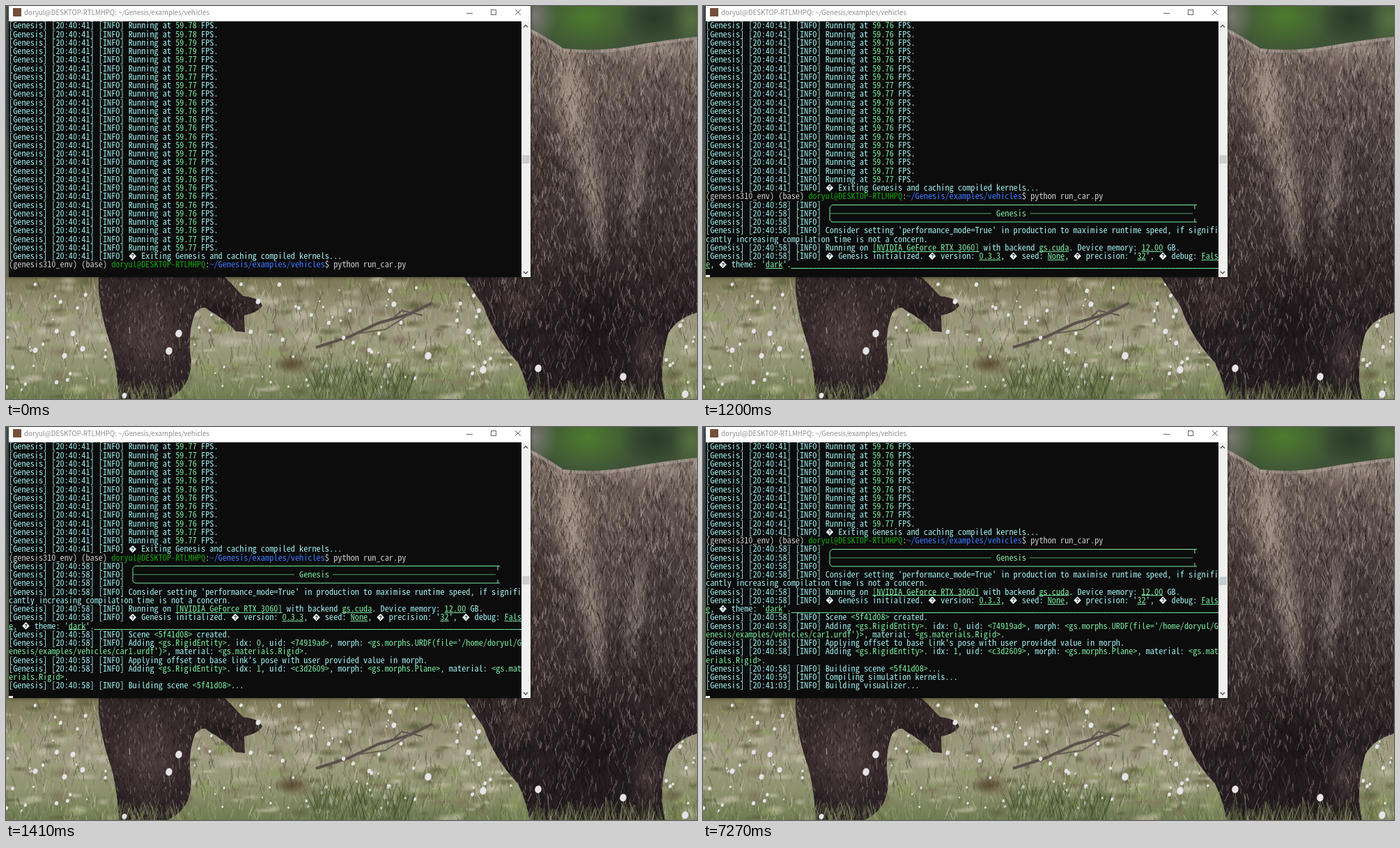
Animation, 992 px wide and 564 px high, one loop 8000 ms. Source, as an HTML page with a canvas:

```html
<!DOCTYPE html>
<html lang="en">
<head>
<meta charset="utf-8">
<title>Terminal</title>
<style>
  html, body { margin: 0; width: 100%; height: 100%; overflow: hidden; background: #0c0c0c; }
  canvas { display: block; width: 992px; height: 564px; }
</style>
</head>
<body>
<canvas id="stage" width="992" height="564"></canvas>
<script>
const LOOP = 8000, W = 992, H = 564;
const COLS = 120, ROWS = 30, LEFT = 4, TOP = 22, CELL = 736 / COLS, LINE = 12.25;
const CYAN = '#a0eeee', MINT = '#7aeaa0', GREY = '#cccccc';
const USER = 'doryul@DESKTOP-RTLMHPQ';

const ctx = document.getElementById('stage').getContext('2d');

// ---------- terminal content ----------
const STYLES = {
  '{': { color: MINT },
  '|': { color: MINT, underline: true },
  '«': { color: '#13a10e' },
  '‹': { color: '#3b78ff' }
};
const log = (clock, text) => `[Genesis] [${clock}] [INFO] ${text}`;
const fpsDigits = '8899' + '7'.repeat(4) + '6'.repeat(7) + '77' + '6'.repeat(8) + '77';

// [time shown, text, base colour]
const output = [
  ...[...fpsDigits].map(d => [0, log('20:40:41', `Running at {59.7${d}} FPS.`)]),
  [0, log('20:40:41', '◆ Exiting Genesis and caching compiled kernels...')],
  [0, `(genesis310_env) (base) «${USER}»:‹~/Genesis/examples/vehicles›$ python run_car.py`, GREY],
  [920, log('20:40:58', '╭')],
  [920, log('20:40:58', ' '.repeat(40) + '{Genesis}')],
  [920, log('20:40:58', '')],
  [990, log('20:40:58', "Consider setting 'performance_mode=True' in production to maximise runtime speed, if significantly increasing compilation time is not a concern.")],
  [990, log('20:40:58', 'Running on |[NVIDIA GeForce RTX 3060]| with backend |gs.cuda|. Device memory: |12.00| GB.')],
  [1200, log('20:40:58', "◆ Genesis initialized. ◆ version: |0.3.3|, ◆ seed: |None|, ◆ precision: '|32|', ◆ debug: |False|, ◆ theme: '|dark|'.|" + ' '.repeat(100) + '|')],
  [1270, log('20:40:58', 'Scene {<5f41d08>} created.')],
  [1270, log('20:40:58', "Adding {<gs.RigidEntity>}. idx: {0}, uid: {<74919ad>}, morph: {<gs.morphs.URDF(file='/home/doryul/Genesis/examples/vehicles/car1.urdf')>}, material: {<gs.materials.Rigid>}.")],
  [1340, log('20:40:58', "Applying offset to base link's pose with user provided value in morph.")],
  [1340, log('20:40:58', 'Adding {<gs.RigidEntity>}. idx: {1}, uid: {<c3d2609>}, morph: {<gs.morphs.Plane>}, material: {<gs.materials.Rigid>}.')],
  [1410, log('20:40:58', 'Building scene {<5f41d08>}...')],
  [2820, log('20:40:59', 'Compiling simulation kernels...')],
  [7270, log('20:41:03', 'Building visualizer...')]
];

// Turns marked-up text into rows of styled cells, wrapped at the window width.
function toRows([time, text, color = CYAN]) {
  const cells = [];
  for (const part of text.split(/(\{.*?\}|\|.*?\||«.*?»|‹.*?›)/)) {
    const style = STYLES[part[0]];
    for (const char of style ? part.slice(1, -1) : part) {
      cells.push({ char, ...(style || { color }) });
      if (char === '◆') cells.push({ char: ' ', color });
    }
  }
  const rows = [];
  for (let i = 0; i < cells.length; i += COLS) rows.push({ time, cells: cells.slice(i, i + COLS) });
  return rows;
}
const allRows = output.flatMap(toRows);

// ---------- drawing helpers ----------
const family = '"Noto Sans Mono CJK KR", "Noto Sans Mono CJK JP", "Liberation Mono", monospace';
ctx.font = `100px ${family}`;
const monoFont = `${CELL / ctx.measureText('0').width * 100}px ${family}`;

function line(g, color, width, ...points) {
  g.strokeStyle = color;
  g.lineWidth = width;
  g.beginPath();
  for (let i = 0; i < points.length; i += 2) g.lineTo(points[i], points[i + 1]);
  g.stroke();
}
function rect(g, color, x, y, w, h) {
  g.fillStyle = color;
  g.fillRect(x, y, w, h);
}
function gradient(g, y0, y1, ...colors) {
  const fill = g.createLinearGradient(0, y0, 0, y1);
  colors.forEach((c, i) => fill.addColorStop(i / (colors.length - 1), c));
  return fill;
}
function glow(g, color, x, y, rx, ry, angle = 0) {
  g.save();
  g.translate(x, y);
  g.rotate(angle);
  g.scale(rx, ry);
  const fill = g.createRadialGradient(0, 0, 0, 0, 0, 1);
  fill.addColorStop(0, color + 'cc');
  fill.addColorStop(1, color + '00');
  rect(g, fill, -1, -1, 2, 2);
  g.restore();
}

// ---------- wallpaper ----------
let seed = 7;
const random = () => (seed = (seed * 16807) % 2147483647) / 2147483647;
const between = (a, b) => a + (b - a) * random();
const pick = list => list[Math.floor(random() * list.length)];

function blades(g, count, x0, x1, y0, y1, length, colors) {
  for (let i = 0; i < count; i++) {
    const x = between(x0, x1), y = between(y0, y1), l = between(.4, 1) * length;
    g.globalAlpha = between(.2, .6);
    line(g, pick(colors), between(.6, 1.5), x, y, x + between(-.5, .5) * l, y - l);
  }
  g.globalAlpha = 1;
}
function flower(g, x, y, r) {
  line(g, '#69704f', 1, x, y, x + 2, y + r * 4);
  g.fillStyle = '#e4e3e6';
  g.beginPath();
  g.ellipse(x, y, r * .85, r, .3, 0, 7);
  g.fill();
}
function bear(g, outline, fill, glows, hairs, area, length) {
  const path = new Path2D(outline);
  g.save();
  g.clip(path);
  g.fillStyle = fill;
  g.fill(path);
  glows.forEach(args => glow(g, ...args));
  const [x0, x1, y0, y1] = area;
  for (let i = 0; i < hairs; i++) {
    const x = between(x0, x1), y = between(y0, y1), l = between(.5, 1) * length;
    const light = random() > .4 + .5 * y / H;
    g.globalAlpha = between(.12, .42);
    line(g, light ? '#c4b6ab' : '#17100f', between(.8, 1.6), x, y, x + l * between(-.5, .5), y + l);
  }
  // pale rim along the back
  g.globalAlpha = .6;
  g.strokeStyle = gradient(g, 0, 110, '#d6ccc2', '#d6ccc200');
  g.lineWidth = 9;
  g.stroke(path);
  g.restore();
}

function paintWallpaper() {
  const canvas = document.createElement('canvas');
  canvas.width = W;
  canvas.height = H;
  const g = canvas.getContext('2d');

  rect(g, '#3f5237', 0, 0, W, H);
  glow(g, '#4f852c', 835, 15, 75, 55);
  glow(g, '#8b8384', 758, 15, 34, 45);
  glow(g, '#263426', 930, 18, 50, 40);
  glow(g, '#5d7843', 985, 20, 30, 40);
  rect(g, gradient(g, 0, 389, '#4e5656', '#3d474b', '#67705a', '#777d5c'), 0, 0, 4, 389);

  rect(g, gradient(g, 385, H, '#78734f', '#969177', '#a09d83', '#8f9370', '#6f7b50'), 0, 385, W, 180);
  for (let i = 0; i < 420; i++) {
    glow(g, pick(['#5d5f3c', '#bab59f', '#80735c', '#8c9a60', '#c3bda9']), between(0, W), between(390, H), between(6, 24), between(3, 10));
  }
  blades(g, 3200, 0, W, 400, 580, 17, ['#55633a', '#c2c2a4', '#85925f', '#675d48', '#d0cab6', '#47482f']);

  line(g, '#5b514b', 4, 445, 490, 492, 475, 535, 455, 580, 442, 612, 426);
  line(g, '#675d56', 2, 505, 470, 545, 464, 575, 445, 592, 431);
  line(g, '#5e544d', 2, 556, 448, 568, 437, 598, 444);
  glow(g, '#5a4630', 412, 514, 28, 17);
  for (let i = 0; i < 190; i++) flower(g, between(0, W), between(398, 555), between(1.2, 3.4));

  bear(g,
    'M133 385 Q130 425 148 480 Q158 505 162 564 H232 Q265 550 266 510 Q260 468 272 440 Q284 428 290 436 Q315 450 330 467 L343 468 L342 444 Q362 440 368 430 Q364 418 340 416 Q326 400 310 385 Z',
    gradient(g, 385, H, '#332829', '#3a2d2f', '#282024'),
    [['#574647', 205, 470, 55, 80], ['#1a1417', 310, 435, 45, 22]],
    2600, [130, 370, 385, 564], 8);

  bear(g,
    'M740 26 Q775 43 800 61 Q850 66 900 57 Q950 48 992 44 V440 Q962 449 951 470 Q936 520 946 564 H752 Q746 535 735 512 Q700 475 686 432 Q668 405 655 385 H740 Z',
    gradient(g, 40, H, '#70625b', '#62544f', '#4f4341', '#372c2e', '#2a2226', '#261e22'),
    [
      ['#b8a799', 812, 130, 30, 140, -.12],
      ['#a99a8f', 842, 265, 22, 110, -.1],
      ['#3a2e2a', 772, 240, 32, 130, -.1],
      ['#9e9187', 930, 62, 100, 24],
      ['#3f3438', 940, 230, 65, 140],
      ['#857872', 905, 250, 20, 110, .15],
      ['#1d161a', 850, 450, 85, 95],
      ['#4b3b37', 735, 420, 40, 45],
      ['#5a4848', 922, 500, 26, 50]
    ],
    12000, [655, 992, 30, 564], 13);

  blades(g, 260, 130, 280, 555, 580, 24, ['#82895c', '#a7aa80', '#5a673c']);
  blades(g, 420, 440, 580, 540, 585, 46, ['#4d5d34', '#838f60', '#374428']);
  blades(g, 520, 700, W, 562, 590, 34, ['#7b8655', '#a8aa82', '#536139']);
  line(g, '#c2b8a7', 1, 177, 461, 178, 470);
  [[234, 495], [248, 470], [606, 502], [685, 522], [764, 520], [886, 532], [975, 557],
   [96, 470], [84, 502], [664, 467], [557, 428], [362, 424], [42, 494], [110, 492], [170, 559]]
    .forEach(([x, y], i) => flower(g, x, y, i < 7 ? 5.5 : 4));
  return canvas;
}
const wallpaper = paintWallpaper();

// ---------- window ----------
function drawWindow(t) {
  ctx.save();
  ctx.shadowColor = '#0008';
  ctx.shadowBlur = 5;
  rect(ctx, '#0c0c0c', LEFT, 0, 749, 389);
  ctx.restore();
  rect(ctx, '#ffffff', LEFT, 0, 749, TOP);
  rect(ctx, '#74503c', 10, 3, 12, 12);
  ctx.font = '9.7px "Noto Sans CJK KR", "Noto Sans CJK JP", "Noto Sans", sans-serif';
  ctx.fillStyle = '#8c8c8c';
  ctx.fillText(`${USER}: ~/Genesis/examples/vehicles`, 26, 13);

  line(ctx, '#666', 1, 661, 10.5, 670, 10.5);
  ctx.strokeRect(696.5, 5.5, 7, 7);
  line(ctx, '#666', 1, 731, 5, 739, 13);
  line(ctx, '#666', 1, 739, 5, 731, 13);

  rect(ctx, '#f0f0f0', 740, TOP, 13, 367);
  line(ctx, '#505050', 1.4, 743, 30.5, 746, 27.5, 749, 30.5);
  line(ctx, '#505050', 1.4, 743, 381, 746, 384, 749, 381);
  rect(ctx, t < 2820 ? '#cdcdcd' : '#c3ced1', 741, t < 2820 ? 214 : 215, 11, 12);
}

function drawBanner(y) {
  const bottom = y + 2 * LINE, middle = y + LINE;
  line(ctx, MINT, 1, 709, y, 185, y, 182, y + 3, 182, bottom - 3, 185, bottom, 709, bottom);
  line(ctx, MINT, 1, 706, y, 706, y + 6);
  line(ctx, MINT, 1, 706, bottom - 5, 706, bottom);
  line(ctx, '#519c6b', 1, 182, middle, 414, middle);
  line(ctx, '#519c6b', 1, 469, middle, 703, middle);
}
function drawDiamond(x, y) {
  ctx.fillStyle = '#e8f4f4';
  ctx.beginPath();
  [[0, -5.3], [5.3, 0], [0, 5.3], [-5.3, 0]].forEach(([dx, dy]) => ctx.lineTo(x + dx, y + dy));
  ctx.fill();
  ctx.save();
  ctx.font = 'bold 7px "Liberation Sans", sans-serif';
  ctx.textAlign = 'center';
  ctx.fillStyle = '#0c0c0c';
  ctx.fillText('?', x, y + 2.6);
  ctx.restore();
}
function drawRow({ cells }, index) {
  const y = TOP + (index + .5) * LINE;
  cells.forEach(({ char, color, underline }, col) => {
    const x = LEFT + col * CELL;
    if (char === '╭') drawBanner(Math.floor(y) + .5);
    else if (char === '◆') drawDiamond(x + CELL, y);
    else if (char !== ' ') {
      ctx.fillStyle = color;
      ctx.fillText(char, x, y + 4.2);
    }
    if (underline) rect(ctx, color, x, Math.round(y + 5), CELL, 1);
  });
}

let shownCount = 0;
function frame() {
  const t = performance.now() % LOOP;
  const rows = allRows.filter(row => row.time <= t);
  if (rows.length !== shownCount) {
    shownCount = rows.length;
    ctx.drawImage(wallpaper, 0, 0);
    drawWindow(t);
    ctx.font = monoFont;
    rows.slice(1 - ROWS).forEach(drawRow);
    if (t >= 920) rect(ctx, '#f2f2f2', LEFT, 386, 6, 3);
  }
  requestAnimationFrame(frame);
}
frame();
</script>
</body>
</html>
```
